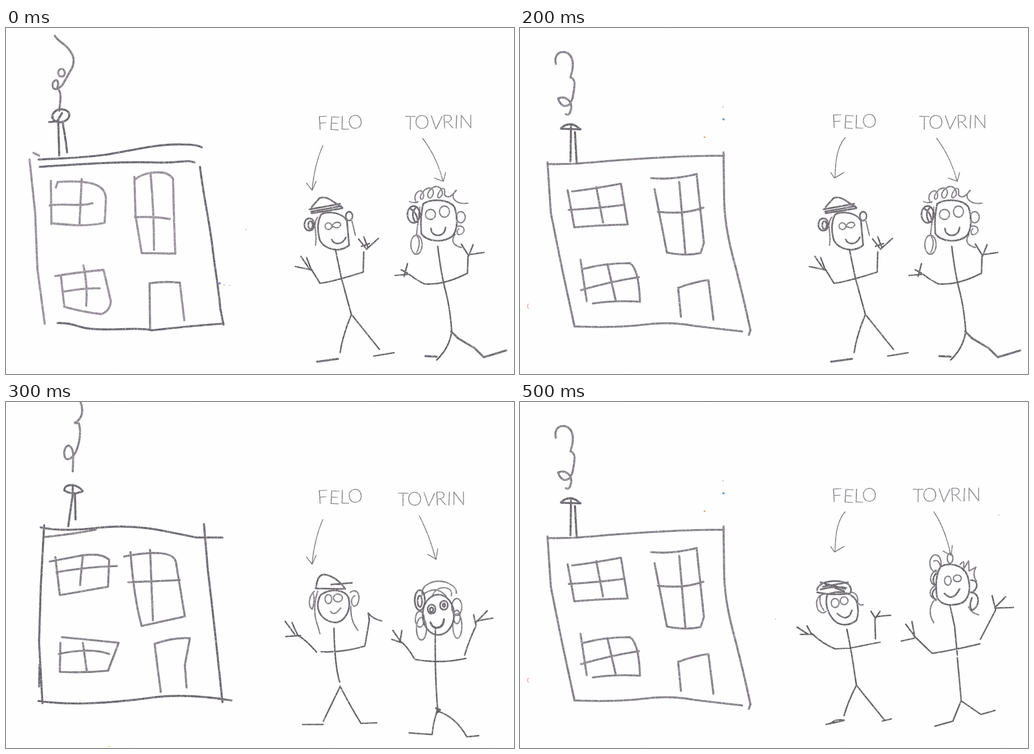
An HTML page with a canvas for the animation above (0.6 s loop, 906 by 618 pixels).

```html
<!DOCTYPE html>
<html lang="en">
<head>
<meta charset="utf-8">
<title>House and two friends</title>
<style>
  html, body { margin: 0; width: 100%; height: 100%; overflow: hidden; background: #fefefe; }
  svg, canvas { position: absolute; left: 0; top: 0; width: 100%; height: 100%; }
  path { fill: none; stroke-linecap: round; stroke-linejoin: round; }
  text { font: 300 34px Lato, "Open Sans", sans-serif; fill: #858287; }
</style>
</head>
<body>
<svg id="stage" viewBox="0 0 906 618"></svg>
<canvas id="grain" width="906" height="618"></canvas>
<script>
const HOLD = 100;
const stage = document.getElementById('stage');

// "O x y rx ry" in a path stands for a closed ellipse.
const ovals = d => d.replace(/O([\d.]+) ([\d.]+) ([\d.]+) ([\d.]+)/g, (_, x, y, a, b) =>
  `M${x - a} ${y}a${a} ${b} 0 1 1 ${2 * a} 0a${a} ${b} 0 1 1 ${-2 * a} 0`);

const line = (d, width, color) =>
  `<path d="${ovals(d)}" stroke="${color}" stroke-width="${width}"/>`;
const pale = d => line(d, 3.8, '#938d95');
const wall = d => line(d, 3.7, '#827d84');
const bold = d => line(d, 3.7, '#67636a');
const limb = d => line(d, 2.7, '#605d62');
const face = d => line(d, 3, '#69666c');
const hair = d => line(d, 2.4, '#7f7b81');
const thin = d => line(d, 1.5, '#716e74');
const dot = (x, y, color = '#b5b1ba', r = 1) =>
  `<circle cx="${x}" cy="${y}" r="${r}" fill="${color}"/>`;
const label = (word, x, y, tilt, jitter) =>
  `<text x="${x}" y="${y}" rotate="${jitter}" transform="rotate(${tilt} ${x} ${y})">${word}</text>`;

const houses = {
  round: pale(`M80 273L81 350M89 285L92 275Q140 272 160 280T178 310L176 348Q140 355 107 351L83 349
      M135 270L131 352M78 317C100 312 130 320 154 313
      M229 266L231 335L242 402L302 403C300 360 299 320 298 270Q290 256 265 258Q240 260 229 272
      M258 262Q264 330 264 396M230 338Q260 336 292 341
      M88 443Q130 436 174 432L187 488Q186 505 170 511Q140 508 104 498L98 444
      M138 424Q146 460 143 496M102 471Q140 464 167 465
      M310 455L318 522M42 235L52 330L56 430L69 528M49 223L59 228`)
    + wall(`M87 14C95 26 104 27 112 38C124 52 122 66 114 78L101 101C90 114 80 110 84 97C90 88 96 96 91 108
      O99 80 6 7M92 107C101 118 96 132 95 148M257 539L256 456Q285 452 310 455`)
    + bold(`M82 160C84 140 112 142 113 155C112 172 82 172 83 158M77 168L91 167L100 152
      M93 163L95 228M101 168L107 205L109 222
      M58 235C110 232 140 232 180 226S270 206 315 208Q340 208 349 213
      M60 248C120 244 200 238 260 240S320 234 336 240
      M346 248C352 300 362 340 368 390S380 470 382 500L388 530
      M92 527Q110 526 130 533T200 538T260 540Q330 532 388 528`)
    + dot(428, 360) + dot(381, 456, '#7d78d0', 2) + dot(389, 459, '#9894cc') + dot(399, 460, '#a5a2c8'),

  gabled: wall(`M103 64C118 62 118 74 112 84C104 92 110 106 97 104C88 98 96 90 108 96C120 104 112 124 105 136Q98 148 91 138
      M92 148L93 149M88 163C98 154 116 160 116 168C112 178 92 176 90 166M92 170L112 164
      M103 176L106 234M110 170L115 221
      M34 247L55 246C100 236 150 222 200 209S280 202 320 211Q345 212 353 228
      M46 253C110 248 170 232 230 222Q280 216 322 211
      M39 248L52 340L66 430L76 524M76 523Q140 516 200 513T300 509L345 515
      M340 226Q352 300 354 318L360 400L363 480L360 492
      M67 286L80 346Q100 354 130 345L173 326L156 268Q110 270 67 286
      M119 268L125 338M68 324Q110 314 175 296
      M216 264Q250 252 281 248L309 374Q270 384 231 392Q222 350 216 264
      M248 250L257 388M210 322Q255 320 300 323
      M107 400Q150 400 190 399L188 464Q140 470 110 470L107 400
      M152 390Q144 430 150 475M102 447Q150 435 190 430
      M264 510L258 427Q290 430 309 435Q310 480 317 514`)
    + dot(409, 571) + dot(118, 596, '#e2a0ac') + dot(292, 545),

  leaning: wall(`M64 64C60 46 72 42 80 43C98 48 96 70 90 88C102 92 96 110 94 124C88 146 72 142 68 126C80 120 94 130 91 145Q88 158 82 154
      M49 240L55 330L75 430L97 532M49 243Q90 244 130 240T240 232T364 228
      M363 222L364 300Q364 350 380 410T411 540L408 548
      M97 533Q170 536 220 530T310 532L396 542
      M85 290L97 356Q140 352 192 351L180 278Q140 286 93 292
      M136 284L148 347M87 325Q140 322 184 316
      M234 268Q270 272 315 261L328 384L322 402Q295 408 262 401L240 288
      M284 275L295 404M246 328Q290 334 327 321
      M108 414L119 488M114 430Q150 420 196 420Q212 430 214 489Q170 486 130 492
      M156 422L171 488M109 468Q165 452 212 445
      M287 516L282 464Q310 454 336 450L345 521`)
    + bold('M73 179Q90 164 108 181L73 180M91 176L90 238M98 186L101 240')
    + dot(363, 163, '#5086aa', 2) + dot(362, 141, '#7898b4') + dot(329, 195, '#d6955c', 1.5)
    + line('M15 493Q12 497 15 501', 1.2, '#e08078'),

  square: wall(`M133 0C140 20 134 30 125 36Q118 38 130 38Q136 60 125 88C115 108 102 106 104 88C108 70 120 78 120 96L119 124
      M70 241Q120 236 160 228
      M88 277L96 345L182 330L184 282Q170 268 130 275L78 285
      M137 274L132 327M90 304Q150 294 198 293
      M211 276Q250 268 275 270T303 286L319 383L242 400Q228 350 222 268
      M257 264L262 390M218 322Q270 320 310 318
      M100 420L201 430L182 480Q140 484 96 482L97 430
      M137 430L144 480M94 450Q150 438 184 450
      M276 518L265 432Q300 420 328 422L319 470L322 510`)
    + bold(`M104 158C104 144 128 146 137 159Q120 168 104 158M119 148V166M119 165L111 222M123 166L124 210
      M68 220L62 330L59 430L65 538M60 469L59 508
      M62 224Q100 232 160 225T280 230L340 242L386 242
      M353 218L360 300Q372 400 386 536M58 534Q100 540 150 538T260 528T402 533`)
    + dot(184, 615, '#e0dc70', 1.5),
};

const pairs = {
  striding: hair(`M556 338C545 352 556 362 552 388M617 345L623 370
      O575 354 6 6M582 356C580 346 598 344 597 352Q592 360 584 355
      M733 312C722 300 738 284 744 294C748 308 736 310 740 298C750 280 764 284 762 296C758 310 748 302 754 292C766 276 780 284 778 298C770 310 766 300 776 288Q784 282 782 298Q790 308 803 290C790 300 800 316 824 313
      O732 387 10 17M738 320L732 370Q742 382 732 402M720 310Q728 314 735 310
      O811 338 8 10M806 354c12-2 14 10 6 14s-10-4-4-10M801 368C790 385 804 390 812 392
      O757 333 9 9O782 328 9 10`)
    + face(`O541 351 9 11O543 352 4 7O612 336 6 8
      M545 320L559 304Q570 300 582 309L600 321M541 324L596 314M545 331L600 322M544 328L598 318
      M562 333C575 326 600 330 608 344L612 388C595 402 570 396 560 380Q552 352 562 333
      M581 378C585 388 600 388 606 374
      O727 333 11 15M720 322Q734 330 734 346M732 320Q720 330 730 347
      M744 314C760 304 790 306 800 320C806 340 806 360 796 372C780 384 752 382 741 368Q738 340 744 314
      M758 358C758 374 782 376 784 356`)
    + limb(`M588 398L598 446L616 512M544 430L560 456Q580 454 637 436L638 400
      M544 432L516 426M541 430L526 408M543 428L536 410
      M629 377L643 395L664 376M638 373L645 391M634 390L648 385
      M616 512Q600 550 596 580M618 514L666 574M656 586Q680 582 692 580
      M770 390Q776 440 784 470T795 542M719 440Q735 452 746 457Q780 460 823 438L824 408
      M717 440L694 442M716 438L705 432M710 444L716 421
      M812 386L824 405L852 401M833 387L824 410M795 540Q792 570 768 593`)
    + bold('M555 596L592 591M748 586L768 587M794 542L806 554L836 572L852 588L892 576'),

  dancing: hair(`M545 342C528 345 526 360 532 372Q540 380 546 374M536 345Q532 360 542 372
      M592 340Q604 342 602 358Q606 364 612 362O562 359 7 8O578 355 7 7
      O741 288 10 15M738 284Q748 280 750 296O767 279 5 9M785 290Q795 278 790 300L800 284L801 302L813 295Q806 308 814 320
      M742 300C728 310 730 325 742 328C728 332 728 350 742 352C730 360 728 380 738 394
      M800 366Q806 378 818 380O763 319 6 8O780 315 7 6`)
    + face(`M530 336C530 320 570 314 586 326Q594 336 588 342Q560 346 530 340M536 322L580 334M540 330L585 322
      M545 326L578 338M536 335Q560 328 582 332
      M548 344C565 336 590 338 600 355Q606 375 600 390C585 402 566 400 556 385Q542 365 548 344
      M566 378Q585 395 592 372M742 306Q732 318 742 330M740 334Q730 344 742 354
      M804 318C822 318 814 340 804 340C820 340 822 365 806 372Q800 365 806 350
      M750 294C765 286 790 290 798 310C806 335 800 355 785 360Q755 368 744 350Q738 315 750 294
      M757 342Q772 358 784 334`)
    + limb(`M583 406Q592 450 596 480L600 506M642 429L592 439L562 441Q540 432 521 414
      M521 415L500 415M519 413L512 400M514 415L494 402
      M634 423L633 388M633 385L626 374M634 386L642 374M633 384Q645 382 661 381
      M600 506Q585 535 578 560M600 506L650 568M578 568Q562 566 556 573L546 576L578 569M646 570L662 566
      M767 364L775 400L780 452M780 457L787 534M820 432Q780 442 735 449L705 420M821 424L848 372
      M705 420L688 397M704 420L699 392M703 422L680 427
      M848 370L842 346M848 366L866 348M848 368L880 367
      M787 533Q780 550 772 570L740 579M787 534L822 558L847 551`)
    + dot(854, 202),

  standing: hair(`M550 338C540 345 538 365 546 370Q552 355 548 342M556 338Q545 370 556 400L560 414
      M614 340C628 330 634 350 626 362C616 372 612 350 622 346M615 365Q614 392 628 408
      O575 352 6 8O592 350 8 7M579 374Q585 384 597 368
      M742 345C740 325 765 316 785 322Q805 330 803 342M760 348C765 325 800 328 794 346M742 345Q768 325 785 347
      O738 388 8 14O741 405 9 20O804 366 9 15O805 400 8 22O804 384 6 12`)
    + face(`M553 332Q555 308 568 308Q590 312 605 334L552 333M580 326L617 323
      M562 344C580 332 605 335 611 350C616 372 605 390 590 394C570 394 556 380 556 362Q557 350 562 344
      O738 354 9 18O738 356 4 10O771 380 28 36O759 370 7 8O759 371 3 4O781 363 7 8O781 363 2 3`)
    + bold('M757 394Q762 405 770 403Q780 402 781 388M767 547L774 550L768 555')
    + limb(`M585 404Q586 470 595 500M562 446Q600 448 640 436L648 390M554 447Q535 425 521 417
      M525 417L499 419M520 416L510 394M515 415L498 392M648 390L646 377Q655 388 670 391
      M596 508L566 570M529 576L566 576M596 508Q615 545 633 574L661 573
      M766 402Q764 480 770 552M730 460Q775 468 820 458M818 452Q826 425 838 400M728 458Q715 435 702 426
      M706 430L688 424M704 428L690 408M703 427L706 408
      M838 398L834 380M838 394L858 373M840 391L868 386
      M770 550Q762 570 760 594L719 591M768 552Q800 560 822 598L843 596`),
};

const short = (x, y, tilt) => label('FELO', x, y, tilt, '-3 4 2 -5');
const long = (x, y, tilt) => label('TOVRIN', x, y, tilt, '2 -3 4 -2 3 1');
const leftTags = {
  low: short(556, 182, -1) + thin('M565 210Q550 245 546 288M536 277L546 290L553 274'),
  bent: short(554, 181, -1) + thin('M582 202Q566 205 567 270M558 262L567 271L578 258'),
  high: short(556, 179, 0) + thin('M580 196Q562 215 562 267M554 258L561 268L578 258'),
};
const nearTag = long(700, 169, -1) + thin('M738 186Q758 215 768 262M754 256L769 264L771 246');
const rightTags = {
  far: long(711, 181, -1) + thin('M743 197Q768 230 779 272M764 268L780 274L784 258'),
  near: nearTag + dot(687, 154),
  nearLow: `<g transform="translate(0 10)">${nearTag}</g>`,
  mid: long(698, 186, -1) + thin('M737 203Q756 240 766 280M752 272L767 281L770 262'),
};

const poses = [
  ['round', 'low', 'far', 'striding'],
  ['gabled', 'bent', 'near', 'dancing'],
  ['leaning', 'high', 'far', 'striding'],
  ['square', 'low', 'mid', 'standing'],
  ['round', 'bent', 'far', 'striding', dot(0, 102)],
  ['leaning', 'high', 'nearLow', 'dancing', dot(456, 388)],
];

stage.innerHTML = poses.map(([house, left, right, pair, extra = '']) =>
  `<g>${houses[house]}${leftTags[left]}${rightTags[right]}${pairs[pair]}${extra}</g>`).join('');
const groups = [...stage.children];

// Paper tooth: pale specks that show only where they cross a pencil stroke.
function paintGrain({ width, height }, ctx) {
  let seed = 7;
  const random = () => (seed = seed * 16807 % 2147483647) / 2147483647;
  ctx.fillStyle = 'rgba(254, 254, 254, 0.3)';
  for (let i = 0; i < 120000; i++) ctx.fillRect(random() * width, random() * height, 1.3, 1.3);
}
const grain = document.getElementById('grain');
paintGrain(grain, grain.getContext('2d'));

function draw(time) {
  const now = Math.floor(time / HOLD) % groups.length;
  groups.forEach((g, i) => g.setAttribute('display', i === now ? 'inline' : 'none'));
}

const start = performance.now();
function tick() {
  draw(performance.now() - start);
  requestAnimationFrame(tick);
}
draw(0);
requestAnimationFrame(tick);
</script>
</body>
</html>
```
